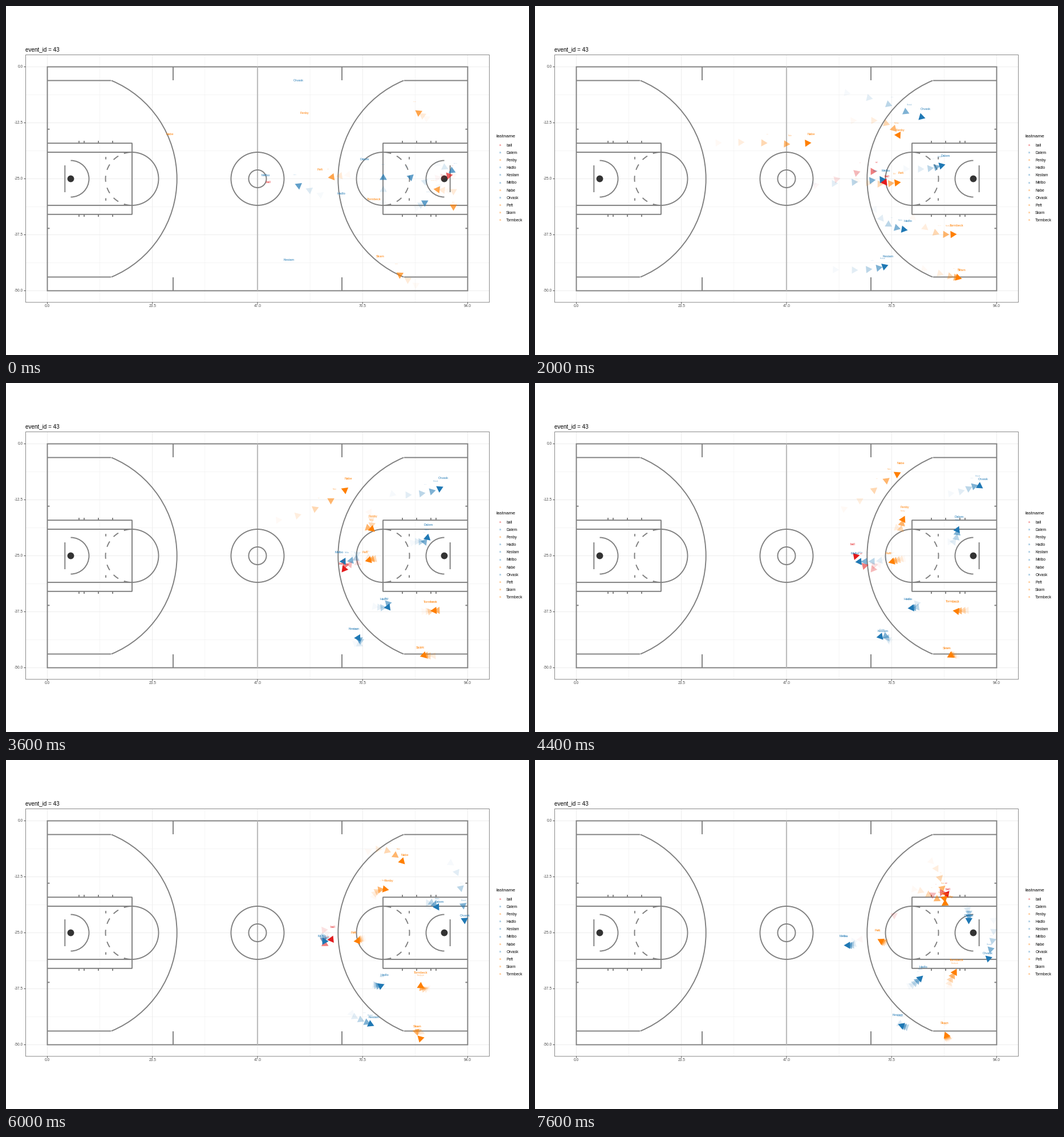
Recreate the animation shown at these times as a matplotlib script. Size 917x611 px, loop 8000 ms.

```python
import numpy as np
import matplotlib.pyplot as plt
from matplotlib.animation import FuncAnimation
from matplotlib.patches import Arc, Circle, Polygon, Rectangle

W, H, DPI = 917, 611, 100
STATES, INTERVAL = 20, 400
BLUE, ORANGE, RED = "#1f78b4", "#ff7f00", "#e31a1c"
LINE = "#7f7f7f"
LEFT, TOP, FOOT = 72, 106, 7.84
KEY_STATES = (0, 2, 5, 7, 11, 15, 19)
WAKE_ALPHA = (1, .57, .3, .13, .04)
WAKE_TEXT = (1, .55, .28)
LABEL_SIZE, LABEL_RISE = 5.6, 15.5
ARROW_LEN, ARROW_HALF = 10.9, 6.3

plt.rcParams["font.family"] = "Liberation Sans"
fig = plt.figure(figsize=(W / DPI, H / DPI), dpi=DPI, facecolor="white")
ax = fig.add_axes([0, 0, 1, 1])
# Whole coordinates fall on pixel centres
ax.set(xlim=(-.5, W - .5), ylim=(H - .5, -.5))
ax.axis("off")


def pt(px):
    return px * 72 / DPI


def write(x, y, s, px, color="black", ha="center", va="center", **kw):
    return ax.text(x, y, s, fontsize=pt(px), color=color, ha=ha, va=va, **kw)


def line(x0, y0, x1, y1, color=LINE, width=1.9, z=2):
    ax.plot([x0, x1], [y0, y1], color=color, lw=pt(width), zorder=z,
            solid_capstyle="butt", snap=False)


def arc(x, y, r, start=0, end=360):
    ax.add_patch(Arc((x, y), 2 * r, 2 * r, theta1=start, theta2=end,
                     color=LINE, lw=pt(1.9), zorder=2))


def box(x, y, w, h, width, z):
    ax.add_patch(Rectangle((x, y), w, h, fill=False, ec=LINE, lw=pt(width),
                           zorder=z, snap=False))


def draw_panel():
    for i in range(9):
        major = i % 2 == 0
        x, y = LEFT + 94 * FOOT * i / 8, TOP + 50 * FOOT * i / 8
        width = .9 if major else .45
        line(x, 85, x, 518, "#ebebeb", width, 0)
        line(34, y, 847, y, "#ebebeb", width, 0)
        if major:
            line(x, 518, x, 521, "#333333", .9)
            line(31, y, 34, y, "#333333", .9)
            write(x, 525.3, f"{94 * i / 8:.1f}", 6.7, "#4d4d4d")
            depth = f"{-50 * i / 8:.1f}" if i else "0.0"
            write(29.5, y, depth, 6.7, "#4d4d4d", ha="right")
    box(34, 85, 813, 433.3, .9, 3)
    write(33.4, 78.4, "event_id = 43", 9.9, ha="left", va="baseline")


def draw_half(right):
    def mx(x):
        return 881 - x if right else x

    def seg(x0, y0, x1, y1):
        line(mx(x0), y0, mx(x1), y1)

    turn = 180 if right else 0
    for side in (-1, 1):
        def my(d):
            return 302 + side * d
        seg(72, my(172), 183.5, my(172))
        seg(72, my(62.3), 221, my(62.3))
        seg(72, my(46.5), 221, my(46.5))
        seg(72, my(86.8), 76, my(86.8))
        seg(292.5, my(196), 292.5, my(172.5))
        seg(174.5, my(34), 174.5, my(38.3))
        for x in (127.5, 136.5, 161.5, 186.5):
            seg(x, my(62.3), x, my(66.5))
    seg(220.5, 239.7, 220.5, 364.3)
    seg(102.8, 278.5, 102.8, 325.5)
    arc(mx(113), 302, 186.2, turn - 67.5, turn + 67.5)
    arc(mx(113), 302, 32, turn - 90, turn + 90)
    arc(mx(220.5), 302, 46.5, turn - 90, turn + 90)
    for k in range(-3, 4):
        middle = turn + 180 + 26.2 * k
        arc(mx(220.5), 302, 46.5, middle - 6.5, middle + 6.5)
    ax.add_patch(Circle((mx(113), 302), 5.9, fc="#333333", lw=0, zorder=2))


def draw_court():
    box(LEFT, TOP, 94 * FOOT, 50 * FOOT, 1.9, 2)
    draw_half(False)
    draw_half(True)
    line(440.5, 106, 440.5, 498, "#bdbdbd", 2.2)
    arc(440.5, 302, 46.5)
    arc(440.5, 302, 15.5)


def smooth_path(when, points):
    """Cubic Hermite curve through the key points, one point per state."""
    when, points = np.array(when, float), np.array(points, float)
    slopes = np.gradient(points, when, axis=0)
    states = np.arange(STATES)
    i = np.clip(np.searchsorted(when, states, "right") - 1, 0, len(when) - 2)
    span = (when[i + 1] - when[i])[:, None]
    t = (states - when[i])[:, None] / span
    ease = t * t * (3 - 2 * t)
    return (points[i] * (1 - ease) + points[i + 1] * ease
            + span * t * (1 - t) * (slopes[i] * (1 - t) - slopes[i + 1] * t))


class Mover:
    """Arrow whose tip is the position and which points along the last step."""

    def __init__(self, name, color, last, step, *keys, when=KEY_STATES):
        self.name, self.color = name, color
        self.last, self.step = np.array(last), np.array(step)
        self.path = smooth_path(when, keys)

    def arrow(self, tip, step, alpha, z):
        u = step / np.hypot(*step)
        side = np.array([-u[1], u[0]]) * ARROW_HALF
        base = tip - u * ARROW_LEN
        return ax.add_patch(Polygon([tip, base + side, base - side],
                                    fc=self.color, ec="none", alpha=alpha,
                                    zorder=z))

    def label(self, tip, scale, alpha, z):
        return write(tip[0], tip[1] - LABEL_RISE, self.name,
                     LABEL_SIZE * scale, self.color, alpha=alpha, zorder=z)

    def previous_play(self, state):
        """Fading marks left over from the moves before the first state."""
        for back in range(3 - state):
            alpha = .7 * .45 ** state * .22 ** back
            yield self.arrow(self.last - back * self.step, self.step, alpha, 4)
        if state == 0:
            yield self.label(self.last, .4, .4, 4)

    def wake(self, state):
        for age, alpha in enumerate(WAKE_ALPHA[:state + 1]):
            i = state - age
            if i > 0:
                step = self.path[i] - self.path[i - 1]
                yield self.arrow(self.path[i], step, alpha, 9 - age)
            if age < len(WAKE_TEXT):
                yield self.label(self.path[i], WAKE_TEXT[age], alpha, 12 - age)

    def draw(self, state):
        return [*self.previous_play(state), *self.wake(state)]


# Each: tip and step at the end of the previous play, then the key points
ball = Mover(
    "ball", RED, (783, 295), (10, -2),
    (460, 323), (535, 301), (599, 289), (617, 314), (595, 316), (588, 331),
    (557, 297), (565, 325), (573, 307), (703, 232), (724, 241),
    when=(0, 2, 4, 5, 7, 9, 11, 14, 15, 17, 19))
players = [
    Mover("Dalem", BLUE, (788, 291), (13, 6),
          (628, 284), (682, 285), (719, 277), (734, 277),
          (743, 250), (759, 263), (760, 287)),
    Mover("Fenby", ORANGE, (717, 182), (-7, -5),
          (523, 202), (600, 200), (640, 232), (640, 255),
          (648, 232), (671, 227), (725, 254)),
    Mover("Hadlo", BLUE, (702, 297), (-25, -8),
          (587, 344), (611, 377), (653, 392), (667, 392),
          (653, 394), (663, 392), (680, 377)),
    Mover("Kestam", BLUE, (740, 340), (7, -4),
          (496, 460), (566, 462), (619, 453), (615, 447),
          (610, 449), (645, 465), (636, 462)),
    Mover("Melbo", BLUE, (506, 311), (-19, -8),
          (455, 311), (531, 310), (615, 303), (607, 310),
          (561, 313), (554, 323), (541, 324)),
    Mover("Nabe", ORANGE, (784, 358), (0, 27),
          (287, 240), (367, 238), (484, 239), (548, 217),
          (641, 156), (699, 182), (719, 249)),
    Mover("Orvask", BLUE, (661, 293), (0, -21),
          (512, 145), (592, 162), (684, 196), (735, 192),
          (785, 184), (804, 287), (793, 354)),
    Mover("Peft", ORANGE, (564, 300), (-14, 2),
          (550, 302), (591, 311), (641, 308), (638, 309),
          (619, 314), (609, 317), (600, 313)),
    Mover("Skarn", ORANGE, (684, 466), (-14, -9),
          (656, 453), (716, 470), (748, 477), (733, 477),
          (722, 480), (721, 482), (718, 475)),
    Mover("Tormbeck", ORANGE, (749, 320), (-9, -1),
          (645, 354), (689, 392), (739, 399), (750, 398),
          (732, 398), (727, 388), (739, 365)),
]


def draw_legend():
    write(859.3, 230, "lastname", 8.25, ha="left", va="baseline")
    for i, m in enumerate([ball] + players):
        y = 242.8 + 13.15 * i
        write(866, y, "a", 5, m.color, alpha=.85)
        write(876.7, y + 2.4, m.name, 6.7, ha="left", va="baseline")


draw_panel()
draw_court()
draw_legend()
moving = []


def update(state):
    while moving:
        moving.pop().remove()
    for m in players + [ball]:
        moving.extend(m.draw(state))
    return moving


anim = FuncAnimation(fig, update, frames=STATES, interval=INTERVAL,
                     init_func=lambda: update(0), repeat=True, repeat_delay=0)
plt.show()
```
